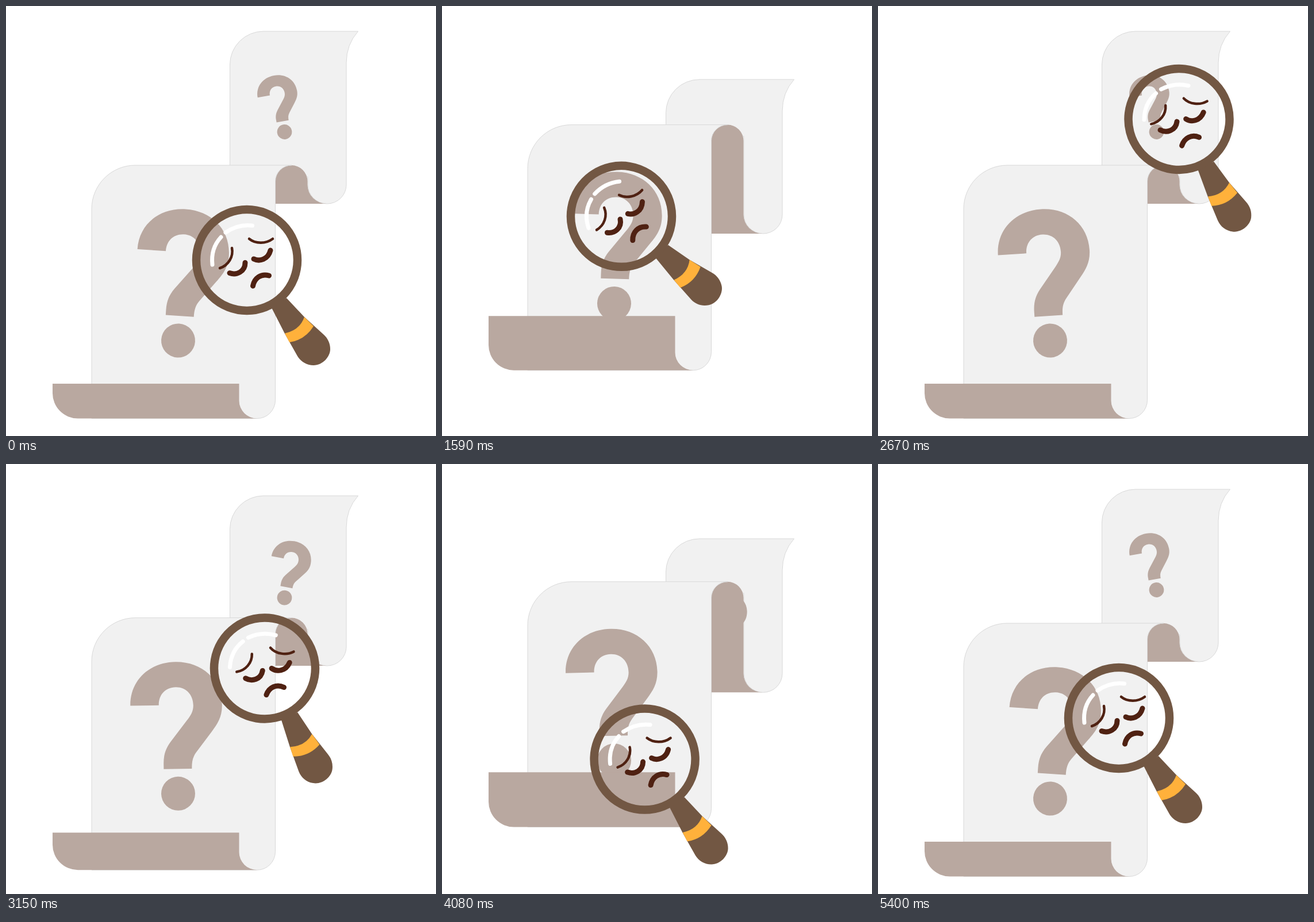
Write an HTML page that moves like this. It is 748 by 748 pixels and loops after 5.43 s.

```html
<!DOCTYPE html>
<html>
<head>
<meta charset="utf-8">
<style>
html, body { margin: 0; width: 100%; height: 100%; overflow: hidden; background: #fff }
svg { display: block; width: 100vw; height: 100vh }
.paper { fill: #f1f1f1; stroke: #d9d9d9 }
.tan { fill: #b9a8a0 }
.line { fill: none; stroke-linecap: round }
</style>
</head>
<body>
<svg viewBox="0 0 748 748">
  <defs>
    <path id="hook" d="M-81-154C-81-198-47-229-1.5-229C44-229 78.5-198 78.5-153C78.5-132 70-120 60-107L33-72C26-63 24.5-55 24.5-43H-24.5V-52C-24.5-67-21-78-12-90L17-127C24-136 28.5-143 28.5-153C28.5-172 16-185-1.5-185C-20-185-31.5-172-31.5-154Z"/>
  </defs>
  <path id="back" class="paper"/>
  <g id="small" class="tan"><circle r="29.5"/><use href="#hook"/></g>
  <path id="fold" class="tan"/>
  <path id="front" class="paper"/>
  <g id="big" class="tan"><circle r="29.5"/><use href="#hook"/></g>
  <path id="band" class="tan"/>
  <g id="lens">
    <path fill="#725743" d="M43 83L69 66L100 99L133 129C141 136 145 145 145 155C145 168 132 183 116 183C104 183 94 177 88 167L66 128Z"/>
    <path fill="#ffb13b" d="M66 127.500Q92 122 100 99L116 115Q101 139 74 143Z"/>
    <g class="line" stroke="#fff" stroke-width="7">
      <path d="M-37-48C-24-57-9-62 9.500-60"/>
      <path d="M-45-40C-57-27-62-10-60 8"/>
    </g>
    <g class="line" stroke="#4f2112" stroke-width="9">
      <path d="M-30 22.500C-18 27-3 20-3 4.500"/>
      <path d="M12-2C22 3 37-1 41-17"/>
      <path d="M10.500 45C13 31 25 23 38.500 27"/>
    </g>
    <g class="line" stroke="#4f2112" stroke-width="4.500">
      <path d="M-26-21C-23-6-32 9-47 14"/>
      <path d="M4-37C15-28 33-28 45-37"/>
    </g>
    <circle r="88" fill="none" stroke="#725743" stroke-width="14.500"/>
  </g>
</svg>
<script>
const $ = id => document.getElementById(id);
const LOOP = 5430, END = 5400;
const cubic = x => x < .5 ? 4 * x ** 3 : 1 - 4 * (1 - x) ** 3;
const smooth = x => x * x * (3 - 2 * x);
const mix = (a, b, e) => a + (b - a) * e;

// Keys are [time, ...values]; returns values eased between neighbours, and the eased fraction.
function track(keys, t, ease) {
  let i = 0;
  while (i < keys.length - 2 && t >= keys[i + 1][0]) i++;
  const a = keys[i], b = keys[i + 1];
  const e = ease(Math.min(1, Math.max(0, (t - a[0]) / (b[0] - a[0]))));
  return { v: a.slice(1).map((n, k) => mix(n, b[k + 1], e)), e, i };
}

const squeeze = [[30, 0], [1340, 86], [2697, 0], [2720, 0], [4066, 86], [END, 0]];
const bigTilt = [3.7, -3.5, 2, -3.7, 2, -3.5, 3.7].map((a, i) => [i * 900, a]);
const smallTilt = Array.from({ length: 13 }, (_, i) => [i * 450, i % 2 ? 10.3 : -10.3]);
// time, x, y, angle
const search = [
  [0, 419, 442, 0], [700, 300, 409, -14], [1500, 303, 373, -13], [2250, 524, 197, 6.3],
  [2670, 523.5, 197, 6.8], [3630, 352, 513, 0], [4440, 353, 514, 0], [END, 419, 442, 0]
];
const DESCENT = 4;

function papers(d) {
  const top = 44 + d, mid = 277 - .84 * d, fold = 344 + .62 * d;
  const roll = 657 - 1.405 * d, foot = 717.5 - d;
  $('back').setAttribute('d', `M389.500 ${mid + 20}V${top + 58}A58.500 58 0 0 1 448 ${top}H612.500Q592 ${top + 23} 592 ${top + 55}V${fold - 33}A33.500 33 0 0 1 525 ${fold - 33}V${mid + 20}Z`);
  $('fold').setAttribute('d', `M468.500 ${fold}V${mid + 28}A28 28 0 0 1 524.500 ${mid + 28}V${fold - 33}A33.500 33 0 0 0 558 ${fold}Z`);
  $('front').setAttribute('d', `M149 ${foot}V${mid + 76}A76 76 0 0 1 225 ${mid}H497A28.500 28 0 0 0 468.500 ${mid + 28}V${foot - 32}A31.500 32 0 0 1 437 ${foot}Z`);
  $('band').setAttribute('d', `M81 ${roll}H405.500V${foot - 31}A31.500 31 0 0 0 437 ${foot}H125A44 44 0 0 1 81 ${foot - 44}Z`);
}

function place(id, x, y, angle, scale = 1) {
  $(id).setAttribute('transform', `translate(${x} ${y}) rotate(${angle}) scale(${scale})`);
}

function draw(now) {
  const t = Math.min(now % LOOP, END);
  const d = track(squeeze, t, cubic).v[0];
  papers(d);
  place('small', 484.5, 219 + 1.21 * d, track(smallTilt, t, cubic).v[0], .436);
  place('big', 299.5, 582 - .77 * d, track(bigTilt, t, cubic).v[0]);

  const { v: [x, y, angle], e, i } = track(search, t, smooth);
  const bow = i === DESCENT ? Math.sin(Math.PI * e) : 0;
  place('lens', x + 12.5 * bow, y, angle + 6.1 * bow);
  requestAnimationFrame(draw);
}
requestAnimationFrame(draw);
</script>
</body>
</html>
```
